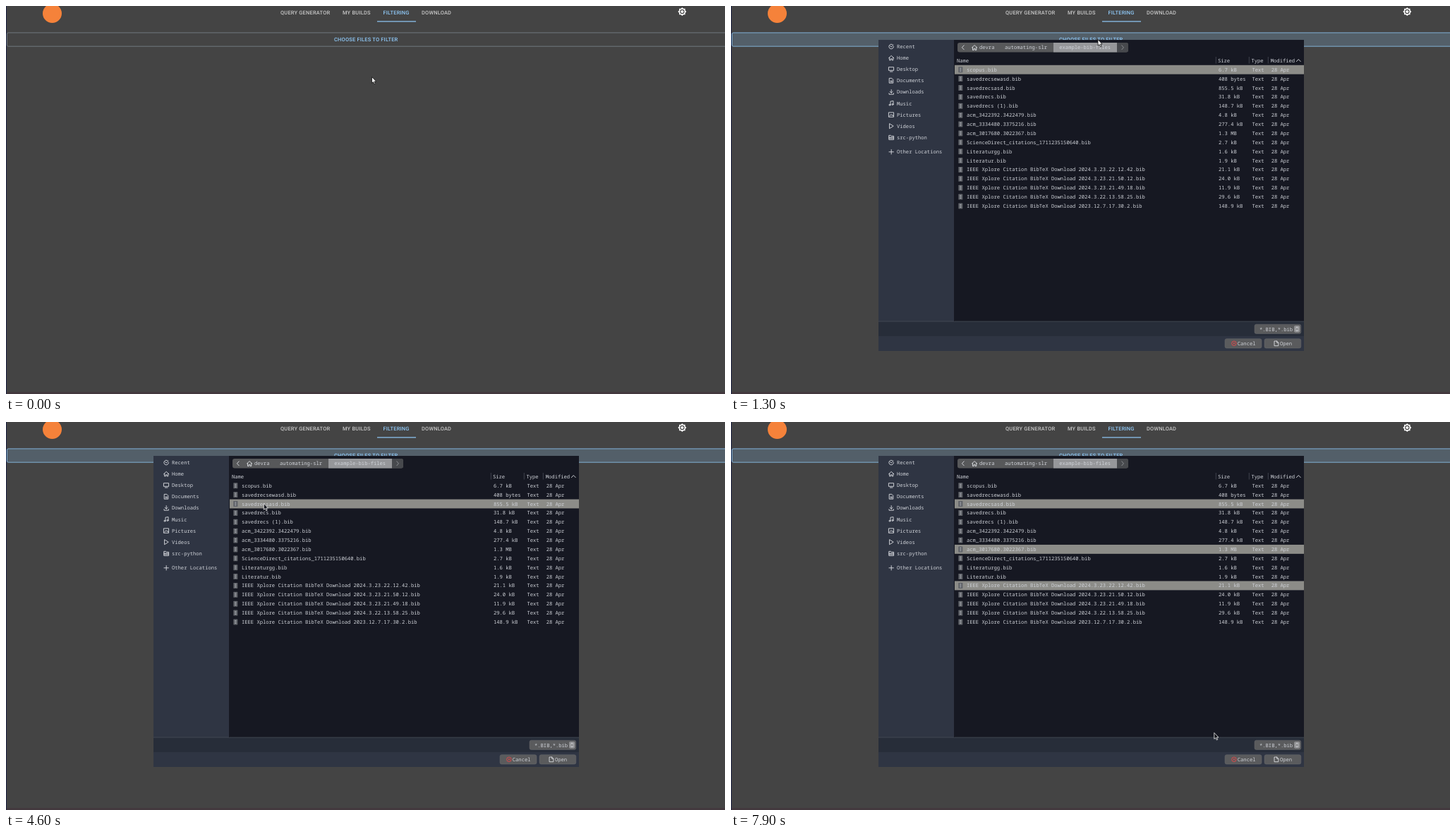
An HTML page that plays this animation: 1019x550 px, repeating every 8000 ms.

```html
<!DOCTYPE html>
<html lang="en">
<head>
<meta charset="utf-8">
<title>File filtering</title>
<style>
  html, body { margin: 0; width: 100%; height: 100%; overflow: hidden; background: #444; }
  svg { display: block; width: 1019px; height: 550px; }
  text { white-space: pre; text-rendering: geometricPrecision; }
  .nav { font: 500 7.45px Roboto, sans-serif; letter-spacing: .02857em; fill: #c7c7c7; }
  .blue { fill: #90caf9; }
  .mono { font: 500 7.15px "Noto Sans Mono", "DejaVu Sans Mono", monospace; fill: #cfd2d8; }
  .line { fill: none; stroke: #dcdee3; stroke-width: .9; stroke-linecap: round; stroke-linejoin: round; }
</style>
</head>
<body>
<svg viewBox="0 0 1019 550" xmlns="http://www.w3.org/2000/svg">
  <defs>
    <clipPath id="barClip"><rect x="1.5" y="38" width="1030" height="19" rx="2"/></clipPath>
  </defs>

  <rect width="1019" height="550" fill="#444"/>
  <rect y="547" width="1019" height="3" fill="#43393e"/>
  <rect width="1" height="550" fill="#1b2140"/>

  <circle cx="65.5" cy="10.5" r="13.5" fill="#f5823a"/>
  <g class="nav">
    <text x="389" y="11.7">QUERY GENERATOR</text>
    <text x="477" y="11.7">MY BUILDS</text>
    <text class="blue" x="534.4" y="11.7">FILTERING</text>
    <text x="589" y="11.7">DOWNLOAD</text>
  </g>
  <rect class="blue" x="526" y="21.3" width="55" height="1.2"/>
  <g transform="translate(958.3 8)">
    <g fill="#fff">
      <rect x="-4.25" y="-4.25" width="8.5" height="8.5"/>
      <rect x="-4.25" y="-4.25" width="8.5" height="8.5" transform="rotate(45)"/>
    </g>
    <circle r="3.2" fill="#444"/>
    <circle r="2.1" fill="#fff"/>
  </g>

  <g id="bar">
    <g clip-path="url(#barClip)" fill="#90caf9">
      <rect id="tint" x="1" y="37" width="1020" height="21" opacity="0"/>
      <circle id="ripple" cx="521" cy="49" r="0" opacity=".13"/>
    </g>
    <rect id="edge" x="1.4" y="37.9" width="1030" height="19.3" rx="2" fill="none" stroke-width=".8"/>
    <text class="nav blue" x="465" y="49.7">CHOOSE FILES TO FILTER</text>
  </g>

  <g id="dialog" visibility="hidden">
    <rect x="209" y="48" width="603" height="441" fill="#2f3543"/>
    <rect x="316.5" y="48" width="495.5" height="399" fill="#161822"/>
    <rect x="209" y="447" width="603" height="21" fill="#272d39"/>
    <rect x="209" y="446.7" width="603" height=".8" fill="#474c57"/>
    <rect x="316" y="48" width=".7" height="399" fill="#13151d"/>

    <g id="crumbs">
      <rect x="321" y="52" width="242" height="13.5" rx="3" fill="#57585a"/>
      <path d="M547 52h13a3 3 0 0 1 3 3v7.500a3 3 0 0 1-3 3h-13z" fill="#47494d"/>
      <rect x="457" y="52" width="90" height="13.500" fill="#96979a"/>
      <path class="line" d="M330.200 55.800l-2.800 3 2.800 3" stroke-width="1.2"/>
      <path class="line" d="M341.400 59l3.700-3.400 3.700 3.400M342.500 58.500v4h1.700v-2.200h1.800v2.200h1.700v-4"/>
      <path class="line" d="M553.800 55.800l2.600 3-2.600 3" stroke-opacity=".5"/>
    </g>

    <g id="places"></g>
    <g id="head">
      <path d="M687.300 72v9.500M734.300 72v9.500M761.300 72v9.500" stroke="#4a4d57" stroke-width=".8"/>
      <path class="line" d="M801.400 78.600l2.900-3 2.900 3" stroke-width="1.1"/>
    </g>
    <g id="files"></g>

    <g id="foot">
      <g fill="#5a5b5d" stroke="#696b6e" stroke-width=".5">
        <rect x="742" y="451.200" width="65.800" height="13.300" rx="2.500"/>
        <rect x="700" y="471.700" width="52" height="13.300" rx="2.500"/>
        <rect x="756" y="471.700" width="51.800" height="13.300" rx="2.500"/>
      </g>
      <rect x="798" y="453" width="8.300" height="9.800" rx="2" fill="#8f9092"/>
      <path class="line" d="M800.400 456.800l1.800-1.900 1.800 1.900M800.400 459.100l1.800 1.900 1.800-1.900"/>
      <g fill="none" stroke="#e0484a" stroke-width=".9">
        <circle cx="712.900" cy="478.300" r="3.300"/>
        <path d="M711.700 477.100l2.400 2.400m0-2.400l-2.400 2.400"/>
      </g>
      <path class="line" d="M770.400 475h3.200l2.200 2.200v4.500h-5.400zM773.600 475v2.200h2.200"/>
    </g>
  </g>

  <path id="cursor" d="M0 0V8.800L2 7.100 3.500 10.300 4.900 9.600 3.500 6.500H6.200Z" stroke-width=".8" stroke-linejoin="round"/>
</svg>

<script>
const LOOP = 8000, FRAME = 100;
const ROW_TOP = 83.8, ROW_H = 12.88;
const $ = id => document.getElementById(id);

function add(parent, tag, attrs, content) {
  const el = document.createElementNS('http://www.w3.org/2000/svg', tag);
  for (const key in attrs) el.setAttribute(key, attrs[key]);
  if (content) el.textContent = content;
  return parent.appendChild(el);
}
const label = (parent, x, mid, content) =>
  add(parent, 'text', { class: 'mono', x, y: mid + 2.5 }, content);

// Sidebar: name and icon outline around its own centre
const places = [
  ['Recent', 'M3.300 0a3.300 3.300 0 1 1-1-2.400M-1.500-1L0 .6 2.800-2'],
  ['Home', 'M-3.700 .2L0-3.200 3.700 .2M-2.600-.4v3.700h1.700V1.200H.9v2.100h1.700V-.4'],
  ['Desktop', 'M-3.400-3H3.400V1.600H-3.400zM-1.800 3.300H1.800'],
  ['Documents', 'M-2.600-3.400H.7L2.600-1.500V3.400H-2.600zM-1.200 .2H1.200M-1.200 1.800H1.200'],
  ['Downloads', 'M0-3.300V1.200M-2-.7L0 1.300 2-.7M-3.200 1.800V3.300H3.200V1.800'],
  ['Music', 'M-1.200 2.200V-2.800L2.800-3.400V1.500M-1.200 2.200a1 1 0 1 1-2 0a1 1 0 1 1 2 0M2.800 1.500a1 1 0 1 1-2 0a1 1 0 1 1 2 0'],
  ['Pictures', 'M-3.400-3.200H3.400V3.200H-3.400zM-2.500 2L-.6-.4 .6 1 1.600 0 2.700 2'],
  ['Videos', 'M-2.300-3.300L3 0-2.300 3.300z'],
  ['src-python', 'M-3.400 2.800V-2.900H-.7L.2-1.900H3.400V2.800zM-3.200-.2H3.200M-3 1.300H3'],
  ['Other Locations', 'M0-3.200V3.200M-3.200 0H3.200']
];
places.forEach(([name, d], i) => {
  const y = i < 9 ? 57.5 + i * 16.1 : 206.8;
  add($('places'), 'path', { class: 'line', d, transform: `translate(227.200 ${y})` });
  label($('places'), 235, y, name);
});

[[352, 'devra'], [388, 'automating-slr'], [465.3, 'example-bib-files']]
  .forEach(([x, s]) => label($('crumbs'), x, 58.7, s));
[[320, 'Name'], [690, 'Size'], [737.5, 'Type'], [764.8, 'Modified']]
  .forEach(([x, s]) => label($('head'), x, 77, s));
label($('foot'), 749, 458, '*.BIB,*.bib');
label($('foot'), 717.8, 478.3, 'Cancel');
label($('foot'), 778, 478.3, 'Open');

const ieee = 'IEEE Xplore Citation BibTeX Download ';
const files = [
  ['scopus', '6.7 kB'], ['savedrecsewasd', '408 bytes'], ['savedrecsasd', '855.5 kB'],
  ['savedrecs', '31.8 kB'], ['savedrecs (1)', '148.7 kB'], ['acm_3422392.3422479', '4.8 kB'],
  ['acm_3334480.3375216', '277.4 kB'], ['acm_3017680.3022367', '1.3 MB'],
  ['ScienceDirect_citations_1711235150640', '2.7 kB'], ['Literaturgg', '1.6 kB'],
  ['Literatur', '1.9 kB'], [ieee + '2024.3.23.22.12.42', '21.1 kB'],
  [ieee + '2024.3.23.21.50.12', '24.0 kB'], [ieee + '2024.3.23.21.49.18', '11.9 kB'],
  [ieee + '2024.3.22.13.58.25', '29.6 kB'], [ieee + '2023.12.7.17.30.2', '148.9 kB']
];
const rows = files.map(([name, size], i) => {
  const top = ROW_TOP + i * ROW_H, mid = top + ROW_H / 2, g = $('files');
  const back = add(g, 'rect', { x: 317, y: top, width: 495, height: ROW_H, fill: 'none' });
  add(g, 'rect', { x: 322.3, y: mid - 4, width: 6, height: 8, rx: .6, fill: '#5d6066' });
  add(g, 'path', { d: `M324.300 ${mid - 2}h2M324.300 ${mid}h2M324.300 ${mid + 2}h2`, stroke: '#c9ccd2', 'stroke-width': .8 });
  [[334, name + '.bib'], [691, size], [738.4, 'Text'], [765.7, '28 Apr']]
    .forEach(([x, s]) => label(g, x, mid, s));
  return back;
});

// Pointer stops: time, x, y
const stops = [
  [0, 518.5, 100.5], [600, 521.3, 49], [1200, 521.3, 48.8], [1300, 520, 47.5],
  [1600, 343.5, 112.5], [1700, 343.5, 112.5], [2100, 400, 134], [2500, 400, 134],
  [2700, 375.3, 123.5], [3100, 375.3, 123.5], [3300, 369, 117.5], [3500, 362.8, 124.4],
  [3600, 362.8, 124.4], [3800, 365.1, 116], [4000, 365.1, 116], [4100, 365.3, 115.5],
  [4900, 365.3, 115.5], [5200, 385, 152], [5500, 372.8, 184], [6000, 372.8, 184],
  [6400, 361.6, 147], [6900, 358, 212.5], [7200, 359, 227.5], [7700, 359, 227.5],
  [7900, 684.8, 440.5]
];
const clamp = u => Math.max(0, Math.min(1, u));

function pointer(t) {
  const i = stops.findIndex(s => s[0] > t);
  if (i < 0) return stops[stops.length - 1].slice(1);
  const [t0, x0, y0] = stops[i - 1], [t1, x1, y1] = stops[i];
  const u = (t - t0) / (t1 - t0), e = u * u * (3 - 2 * u);
  return [x0 + (x1 - x0) * e, y0 + (y1 - y0) * e];
}

// cubic-bezier(.4, 0, .2, 1)
function standardEase(u) {
  let lo = 0, hi = 1;
  for (let i = 0; i < 20; i++) {
    const s = (lo + hi) / 2, r = 1 - s;
    if (1.2 * r * r * s + .6 * r * s * s + s ** 3 < u) lo = s; else hi = s;
  }
  return lo * lo * (3 - 2 * lo);
}

function selected(t) {
  if (t < 4600) return [0];
  return [2, ...(t >= 5800 ? [7] : []), ...(t >= 7500 ? [11] : [])];
}

function draw(t) {
  const [x, y] = pointer(t), open = t >= 1300;

  const hover = clamp((t - 300) / 250);
  $('tint').setAttribute('opacity', .08 * hover);
  $('edge').setAttribute('stroke', hover ? `rgba(144,202,249,${.5 + .5 * hover})` : '#7b868d');
  $('ripple').setAttribute('r', 522 * standardEase(clamp((t - 770) / 550)));

  $('dialog').setAttribute('visibility', open ? 'visible' : 'hidden');
  const over = t >= 1600 ? Math.floor((y - ROW_TOP) / ROW_H) : -1;
  const picked = selected(t);
  rows.forEach((row, i) => row.setAttribute('fill',
    picked.includes(i) ? '#8c8c88' : i === over ? '#1d2031' : 'none'));

  const dark = t > 1300;
  $('cursor').setAttribute('transform', `translate(${x} ${y})`);
  $('cursor').setAttribute('fill', dark ? '#14161c' : '#fff');
  $('cursor').setAttribute('stroke', dark ? '#f2f2f2' : '#111');
}

function tick() {
  draw(Math.floor(performance.now() % LOOP / FRAME) * FRAME);
  requestAnimationFrame(tick);
}
tick();
</script>
</body>
</html>
```
